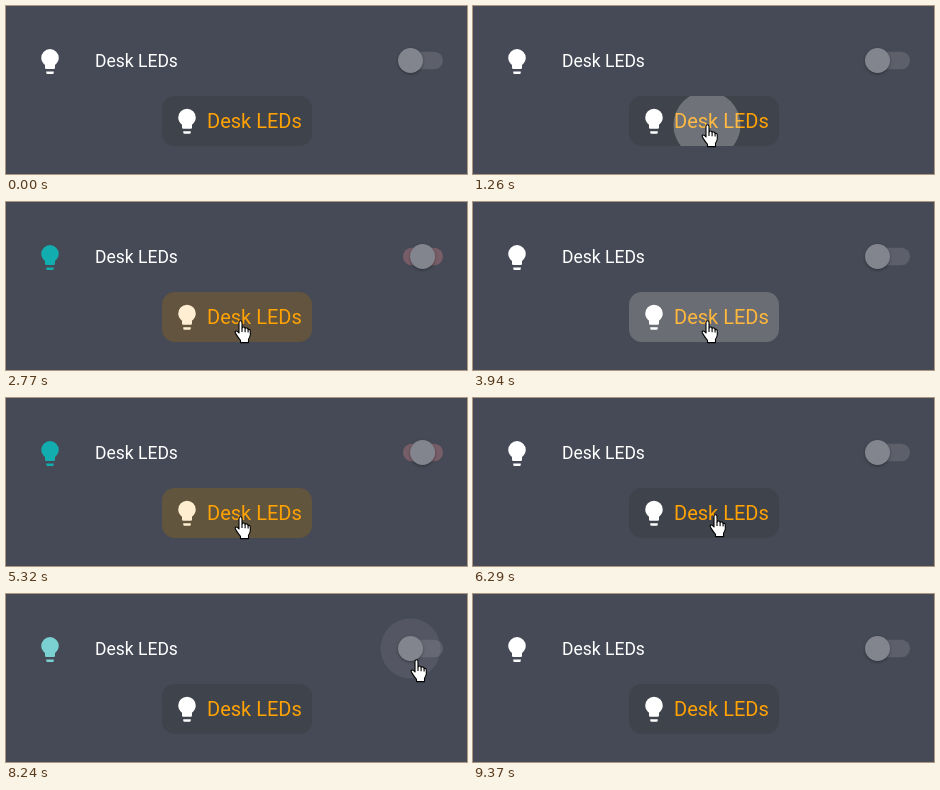
An HTML page with a canvas that plays this animation: 461x168 px, repeating every 9420 ms.

```html
<!DOCTYPE html>
<html lang="en">
<head>
<meta charset="utf-8">
<title>Desk LEDs</title>
<style>
html, body { margin: 0; width: 100%; height: 100%; overflow: hidden; background: #454a56; }
canvas { display: block; width: 461px; height: 168px; }
</style>
</head>
<body>
<canvas id="stage"></canvas>
<script>
const W = 461, H = 168, LOOP = 9420;
const canvas = document.getElementById('stage');
const ctx = canvas.getContext('2d');
const dpr = window.devicePixelRatio || 1;
canvas.width = W * dpr;
canvas.height = H * dpr;

const PAGE = '#454a56';
const WHITE = [255, 255, 255], TEAL = [2, 167, 169];
const GREY = [131, 133, 142], RED = [230, 95, 101];
const ORANGE = [255, 162, 4], YELLOW = [251, 196, 45];

const bulb = new Path2D('M12,2A7,7 0 0,0 5,9C5,11.38 6.19,13.47 8,14.74V17A1,1 0 0,0 9,18H15A1,1 0 0,0 16,17V14.74C17.81,13.47 19,11.38 19,9A7,7 0 0,0 12,2M9,21A1,1 0 0,0 10,22H14A1,1 0 0,0 15,21V20H9V21Z');
const hand = new Path2D('M5 13V2.6Q5 .8 6.5 .8Q8 .8 8 2.6V8Q8.4 7 9.7 7Q11 7 11.1 8.4Q12 7.6 13 8Q14 8.4 14.1 9.6Q15 9.1 15.8 9.7Q16.3 10.3 16.3 11.6V15Q16 17 14.5 19.2V22.6H6.5V20.4Q4 17.5 2.2 14.4Q.6 11.8 1.4 11.2Q3 10.4 5 13Z');
const creases = new Path2D('M8 8V12M11.1 8.6V12.2M14.1 9.8V12.6');
const card = new Path2D();
card.roundRect(156, 90, 150, 50, 12.5);

// Times when the light, and the switch, flip; even entries turn on.
const lightFlips = [1390, 2725, 3945, 5275, 6930, 8095];
const switchFlips = [1390, 2725, 3945, 5275, 6905, 8075];
// Card presses: [down, up]
const cardPresses = [[1220, 1350], [2550, 2685], [3800, 3910], [5100, 5238]];
const switchPresses = [6830, 8025];
const focusEnd = 9365;

const clamp = x => Math.min(1, Math.max(0, x));
const smooth = x => x * x * (3 - 2 * x);
const lerp = (a, b, k) => a + (b - a) * k;
const mix = (a, b, k) => a.map((v, i) => lerp(v, b[i], k));
const rgba = (c, a = 1) => `rgba(${c.map(Math.round).join(',')},${a})`;

// 0 = off, 1 = on, eased over dur after each flip
function level(t, flips, dur) {
  const i = flips.filter(f => f <= t).length - 1;
  if (i < 0) return 0;
  const k = dur ? smooth(clamp((t - flips[i]) / dur)) : 1;
  return i % 2 ? 1 - k : k;
}

function disc(x, y, r, fill) {
  ctx.beginPath();
  ctx.arc(x, y, r, 0, Math.PI * 2);
  ctx.fillStyle = fill;
  ctx.fill();
}

function icon(x, y, color) {
  ctx.save();
  ctx.translate(x, y);
  ctx.scale(1.25, 1.25);
  ctx.fillStyle = rgba(color);
  ctx.fill(bulb);
  ctx.restore();
}

function label(x, y, size, color) {
  ctx.font = `400 ${size}px Roboto, sans-serif`;
  ctx.fillStyle = rgba(color);
  ctx.fillText('Desk LEDs', x, y);
}

function drawSwitch(t) {
  const k = level(t, switchFlips, 90);
  const on = level(t, switchFlips, 0);
  const x = lerp(404.5, 429.5, k), y = 54.5;
  const tint = on ? RED : GREY;

  ctx.beginPath();
  ctx.roundRect(397, 45.75, 40, 17.5, 8.75);
  ctx.fillStyle = rgba(mix(GREY, RED, k), lerp(0.38, 0.54, k));
  ctx.fill();

  if (t >= switchPresses[0] && t < focusEnd) {
    disc(x, y, 30, rgba(tint, 0.12 * clamp((t - switchPresses[0]) / 75)));
  }
  for (const down of switchPresses) {
    const e = t - down;
    if (e < 0 || e > 375) continue;
    const alpha = 0.12 * clamp(e / 75) * clamp((375 - e) / 150);
    disc(x, y, lerp(18, 30, smooth(clamp(e / 225))), rgba(tint, alpha));
  }

  ctx.save();
  ctx.shadowColor = 'rgba(0,0,0,0.35)';
  ctx.shadowBlur = 3 * dpr;
  ctx.shadowOffsetY = dpr;
  disc(x, y, 12.5, rgba(tint));
  ctx.restore();
}

function drawCard(t) {
  const on = level(t, lightFlips, 0);
  ctx.fillStyle = on ? '#4f93e1' : '#3f434b';
  ctx.fill(card);
  icon(166, 100.2, on ? YELLOW : WHITE);
  label(201, 122, 20, on ? YELLOW : ORANGE);

  cardPresses.forEach(([down, up], i) => {
    const alpha = 0.25 - 0.0008 * Math.max(0, t - up);
    if (t < down || alpha <= 0) return;
    ctx.save();
    ctx.clip(card);
    const r = 180 * (1 - Math.pow(80, -(t - down) / 872));
    disc(234, 119, r, rgba(i % 2 ? ORANGE : WHITE, alpha));
    ctx.restore();
  });
}

function bezier(p, u) {
  const v = 1 - u;
  const at = i => v * v * v * p[0][i] + 3 * v * v * u * p[1][i] + 3 * v * u * u * p[2][i] + u * u * u * p[3][i];
  return [at(0), at(1)];
}

function pointer(t) {
  if (t < 735 || t > 9040) return null;
  if (t < 6238) {
    const k = 1 - Math.pow(1 - clamp((t - 735) / 375), 2);
    return [lerp(242, 228, k), lerp(170, 118, k)];
  }
  if (t < 8670) {
    const k = smooth(clamp((t - 6238) / 432));
    return bezier([[228, 118], [290, 105], [380, 0], [404, 65]], k);
  }
  const k = Math.pow((t - 8670) / 370, 1.6);
  return [lerp(404, 338, k), lerp(65, 170, k)];
}

function drawPointer(t) {
  const p = pointer(t);
  if (!p) return;
  ctx.save();
  ctx.translate(Math.round(p[0]), Math.round(p[1]));
  ctx.fillStyle = '#fff';
  ctx.strokeStyle = '#000';
  ctx.lineWidth = 1.1;
  ctx.lineJoin = 'round';
  ctx.fill(hand);
  ctx.stroke(hand);
  ctx.stroke(creases);
  ctx.restore();
}

function draw() {
  const t = performance.now() % LOOP;
  ctx.setTransform(dpr, 0, 0, dpr, 0, 0);
  ctx.fillStyle = PAGE;
  ctx.fillRect(0, 0, W, H);
  icon(29, 40.6, mix(WHITE, TEAL, level(t, lightFlips, 300)));
  label(89, 61, 17.5, WHITE);
  drawSwitch(t);
  drawCard(t);
  drawPointer(t);
  requestAnimationFrame(draw);
}
draw();
</script>
</body>
</html>
```
